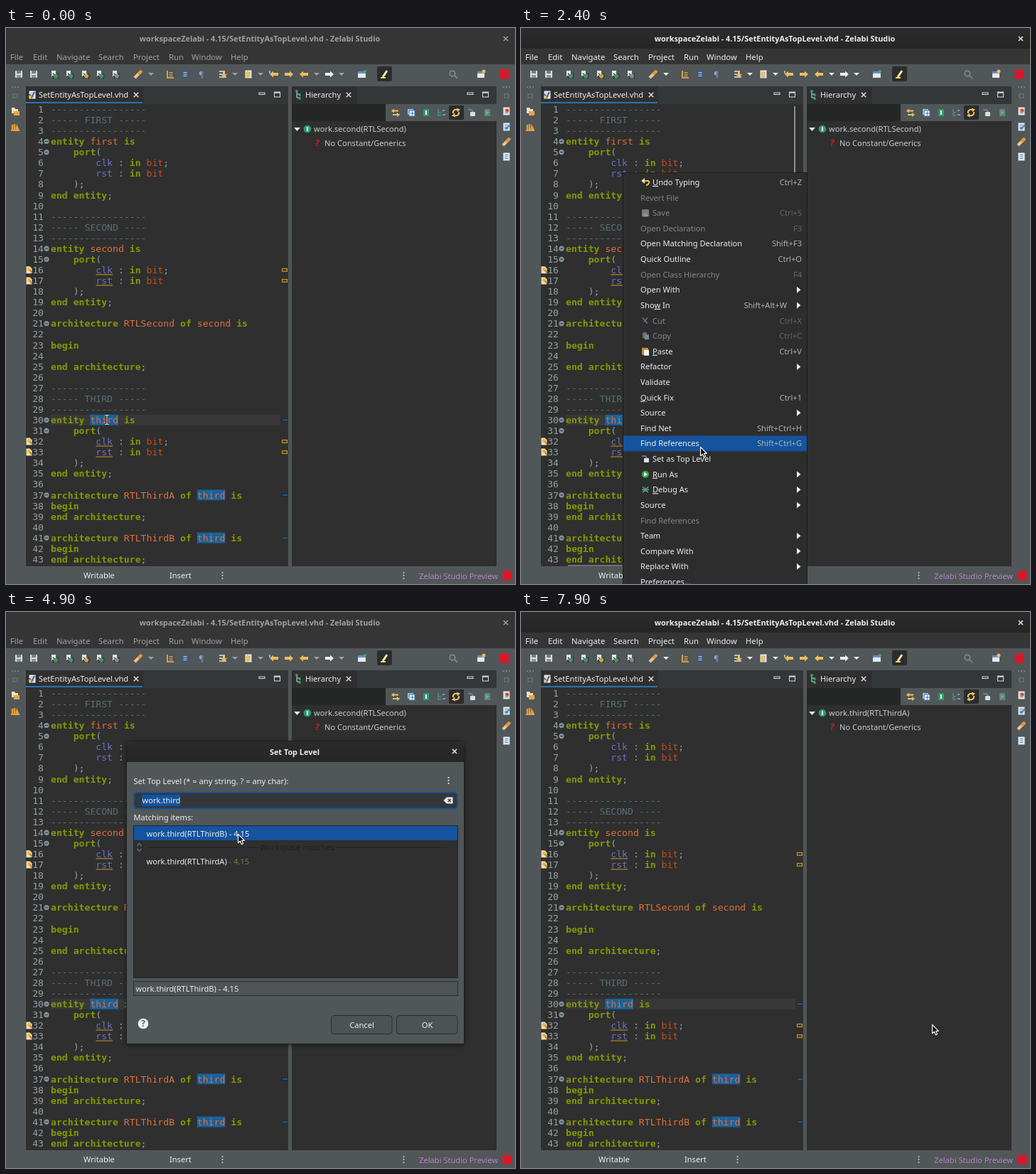
Write an HTML page that moves like this. It is 716 px wide and 782 px high and loops after 8000 ms.

```html
<!DOCTYPE html>
<html lang="en">
<head>
<meta charset="utf-8">
<title>Set Top Level</title>
<style>
html, body { margin: 0; width: 100%; height: 100%; overflow: hidden; background: #515658; }
svg { display: block; }
text { font: 11.1px "Noto Sans", "Open Sans", sans-serif; fill: #eeeeec; white-space: pre; }
.code { font: 13.15px "DejaVu Sans Mono", monospace; fill: #93a1a1; }
.kw { fill: #859900; font-weight: bold; }
.rem { fill: #586e75; }
.id { fill: #e0703a; }
.sig { fill: #6c71c4; }
.type { fill: #cb4b16; }
.bold { font-size: 10.85px; font-weight: bold; }
.ink text, .ink path { fill: currentColor; }
.u { text-decoration: underline; }
.shadow { filter: blur(3px); }

.a { animation: 8s step-end infinite; }
.smooth { animation-timing-function: linear; }
.ink { animation-name: ink; }
.lit { animation-name: lit; }
.vbar { animation-name: vbar; }
.hbar { animation-name: hbar; }
.menu { animation-name: menu; }
.hover { animation-name: hover; }
.dialog { animation-name: dialog; transform-origin: 407px 394px; }
.first { animation-name: first; }
.second { animation-name: second; }
.field { animation-name: field; }
.press { animation-name: press; }
.old { animation-name: old; }
.new { animation-name: new; }
.move { animation-name: move; }
.beam { animation-name: beam; }
.arrow { animation-name: arrow; }
.size { animation-name: size; }

@keyframes ink { 0%, 45% { color: #a0a1a1 } 2.5%, 96.25%, 100% { color: #eeeeec } }
@keyframes lit { 0%, 45% { opacity: 0 } 2.5%, 96.25%, 100% { opacity: 1 } }
@keyframes vbar { 0% { opacity: 0 } 2.5% { opacity: .5 } 16.25% { opacity: .8 } 37.5%, 100% { opacity: 0 } }
@keyframes hbar { 0% { opacity: 0 } 8.75% { opacity: .4 } 16.25% { opacity: .55 } 37.5% { opacity: .3 } 40%, 100% { opacity: 0 } }
@keyframes menu { 0%, 8.7% { opacity: 0 } 8.75% { opacity: .6 } 10%, 44.9% { opacity: 1 } 45% { opacity: .7 } 46.25%, 100% { opacity: 0 } }
@keyframes hover {
  0% { opacity: 0; transform: none }
  23.75% { opacity: 1; transform: translateY(530.4px) }
  25.2% { opacity: 1; transform: translateY(552px) }
  27.4% { opacity: 1; transform: translateY(573.6px) }
  37.5%, 100% { opacity: 1; transform: translateY(595.2px) }
}
@keyframes dialog {
  0%, 45% { opacity: 0; transform: scale(.85) }
  46.25% { opacity: 1; transform: scale(.97) }
  47.5% { opacity: 1; transform: scale(.996) }
  48.75%, 93.8% { opacity: 1; transform: none }
  95% { opacity: .5; transform: scale(.94) }
  96.25%, 100% { opacity: 0; transform: scale(.85) }
}
@keyframes first { 0% { opacity: 0 } 61.25% { opacity: 1 } 72.5%, 100% { opacity: 0 } }
@keyframes second { 0% { opacity: 0 } 72.5%, 100% { opacity: 1 } }
@keyframes field { 0%, 61.2% { stroke: #15539e; stroke-width: 2 } 66%, 100% { stroke: #222627; stroke-width: 1 } }
@keyframes press { 0% { opacity: 0 } 82.5%, 100% { opacity: 1 } }
@keyframes old { 0% { opacity: 1 } 96.25%, 100% { opacity: 0 } }
@keyframes new { 0% { opacity: 0 } 96.25%, 100% { opacity: 1 } }
@keyframes move {
  0%, 22.5% { transform: translate(142px,551px); animation-timing-function: ease-in-out }
  30%, 37.4% { transform: translate(252px,589px) }
  37.5%, 48.5% { transform: translate(287px,606px); animation-timing-function: ease-in-out }
  52.5%, 53.75% { transform: translate(315px,245px); animation-timing-function: ease-in-out }
  58.75%, 71.25% { transform: translate(326px,312px) }
  72.5%, 77.5% { transform: translate(323px,351px); animation-timing-function: ease-in-out }
  83.75%, 88.75% { transform: translate(595px,591px) }
  91.25%, 98.7% { transform: translate(592px,584px) }
  98.75%, 100% { transform: translate(578px,580px) }
}
@keyframes beam { 0% { opacity: 1 } 8.75%, 100% { opacity: 0 } }
@keyframes arrow { 0% { opacity: 0 } 8.75% { opacity: 1 } 46.25% { opacity: 0 } 48.75%, 100% { opacity: 1 } }
@keyframes size { 0% { opacity: 0 } 46.25% { opacity: 1 } 48.75%, 100% { opacity: 0 } }
</style>
</head>
<body>
<svg id="stage" width="716" height="782" viewBox="0 0 716 782"></svg>
<script>
const rect = (x, y, w, h, fill, more = '') => `<rect x="${x}" y="${y}" width="${w}" height="${h}" fill="${fill}" ${more}/>`;
const path = (d, fill, more = '') => `<path d="${d}" fill="${fill}" ${more}/>`;
const line = (d, color, w = 1) => path(d, 'none', `stroke="${color}" stroke-width="${w}"`);
const dot = (x, y, r, fill) => `<circle cx="${x}" cy="${y}" r="${r}" fill="${fill}"/>`;
const group = (cls, ...parts) => `<g class="${cls}">${parts.join('')}</g>`;
const at = (x, y, s) => `<g transform="translate(${x} ${y})">${s}</g>`;
// y is the middle of the capitals
const text = (x, y, s, more = '') => `<text x="${x}" y="${y + 4}" ${more}>${s}</text>`;
const END = 'text-anchor="end"', MID = 'text-anchor="middle"';
const cross = (x, y, r, color) => line(`M${x - r} ${y - r}l${2 * r} ${2 * r}m0 ${-2 * r}l${-2 * r} ${2 * r}`, color, 1.5);
const dots = (x, y, color) => [-4, 0, 4].map(d => dot(x, y + d, 1.1, color)).join('');
const down = x => path(`M${x - 4} 63h8l-4 4z`, '');

// icons, centred on 0,0
const GOLD = '#f0bd5c';
const doc = (c = '#e6e6e0', ink = '#6f8aa5') =>
  rect(-4.5, -5.5, 9, 11, c) + line('M-2.5 -2.5h5M-2.5 0h5M-2.5 2.5h5', ink);
const floppy = c => rect(-5, -5, 10, 10, c, 'rx="1"') + rect(-3, -5, 6, 4, '#777d80') + rect(-3, 1, 6, 4, '#8f9598');
const bug = c => rect(-5, -5, 6, 8, '#e4e4de') + line('M-3 -1L5 6M5 -1L-3 6M-4 2.5h10', '#20292b', 1.2) + dot(1, 2.5, 3, c);
const pen = line('M-5 5L4 -4', '#f0c48a', 4) + line('M0 0L5 -5', '#e0963c', 4);
const arrow = (c, flip = 1) => path(`M${-6 * flip} 0L${-1 * flip} -4.5V-2H${6 * flip}V2H${-1 * flip}V4.5z`, c);
const folder = path('M-5 -5h4l1 2h4v6h-9z', '#f2e3c0') + path('M-2 0h8v6h-8z', '#e5a44b');
const swap = c => line('M-5 -2.5H4M-4 3H5', c, 1.8) + path('M-6 -2.5l4 -3v6zM6 3l-4 -3v6z', c);
const cycle = c => line('M-4 1A4 4 0 0 1 2 -3.5M4 -1A4 4 0 0 1 -2 3.5', c, 2) + path('M1 -6.5l5 2l-4 4zM-1 6.5l-5 -2l4 -4z', c);
const cup = rect(-2, -1, 7, 6, '#d8dfe5', 'rx="1"') + line('M-5 -4h5l2 3', '#6b90c0', 1.6);
const run = dot(0, 0, 5, '#35a853') + path('M-1.7 -3v6l4.5 -3z', '#fff');
const badge = dot(0, 0, 5.3, '#2f9c72') + rect(-1, -3, 2, 6, '#e9fff4');
const square = rect(-6.5, -6.5, 13, 13, '#d7182a');

const source = `-----------------
----- FIRST -----
-----------------
entity first is
    port(
        clk : in bit;
        rst : in bit
    );
end entity;

-----------------
----- SECOND ----
-----------------
entity second is
    port(
        clk : in bit;
        rst : in bit
    );
end entity;

architecture RTLSecond of second is

begin

end architecture;

-----------------
----- THIRD -----
-----------------
entity third is
    port(
        clk : in bit;
        rst : in bit
    );
end entity;

architecture RTLThirdA of third is
begin
end architecture;

architecture RTLThirdB of third is
begin
end architecture;`.split('\n');

const keywords = /^(entity|is|port|in|end|architecture|of|begin)$/;
const kind = w => w.startsWith('--') ? 'rem' : keywords.test(w) ? 'kw'
  : /^(clk|rst)$/.test(w) ? 'sig' : w === 'bit' ? 'type' : 'id';
const paint = s => s.replace(/--.*|\w+/g, w => `<tspan class="${kind(w)}">${w}</tspan>`);

function codeLine(s, i) {
  const y = 114.3 + 15.07 * i, n = i + 1, pitch = 7.917;
  const col = word => 63 + pitch * s.indexOf(word);
  let out = '';
  if (n === 30) out += rect(63, y - 7.5, 323, 15, '#383838');
  if (s.includes('third')) {
    out += rect(col('third'), y - 7.5, 5 * pitch, 15, '#1b6199');
    out += rect(388, y - 1.5, 8, 3, '#14283a') + rect(389, y - .5, 7, 1.2, '#2c7db8');
  }
  if (/clk|rst/.test(s) && n > 10) {
    out += line(`M${63 + 8 * pitch} ${y + 6.5}h${3 * pitch}`, '#b58a2a', 1.2);
    out += rect(388.5, y - 2, 7, 4, '#4a3d1c', 'stroke="#d0a032"');
    out += at(32.5, y, path('M-4 -5h5l3 3v7h-8z', '#f0e2bd') + dot(0, -1, 2.5, '#f3b73a') + line('M1 0l3 4', '#c9812b', 2));
  }
  out += text(53, y + .7, n, `class="code" ${END}`);
  if (/^(entity|arch)|port/.test(s)) out += dot(57, y, 3.6, '#7e94a0') + line(`M55 ${y}h4`, '#2f2f2f');
  return out + text(63, y + .7, paint(s), 'class="code"');
}

const paneButtons = x => rect(x - 4, 91, 8, 2.5, 'none', 'stroke="#ddd"') +
  rect(x + 17.5, 90, 8, 7, 'none', 'stroke="#ddd"') + line(`M${x + 17} 91h9`, '#ddd', 1.5);

function shell() {
  const labels = { File: 6, Edit: 38, Navigate: 71, Search: 130, Project: 179, Run: 229, Window: 261, Help: 316 };
  const tools = [
    [18, floppy('#d9dcdc')], [39, floppy('#d9dcdc')], [69, bug('#3d9960')], [90, bug('#3d9960')], [112, bug('#c9a545')],
    [133, bug('#3d9960')], [155, bug('#7e8e99')], [186, pen],
    [232, doc('#514f48', GOLD) + line('M-5 -5v10h9', GOLD, 1.5)], [252, doc('#40597a', '#b8d0ee')],
    [305, line('M-5 -4h8M-5 0h4M-5 4h10', '#dfe3e5', 1.4) + path('M0 -5h3v5h3l-4.5 5L-3 0h3z', GOLD)],
    [341, doc('#e6e6e0') + path('M-5 0l4 -5l4 5h-2v5h-4v-5z', GOLD)],
    [377, arrow(GOLD) + line('M-6 -5v4', '#fff')], [398, arrow(GOLD, -1)], [419, arrow(GOLD)], [455, arrow('#eef0f0', -1)],
    [501, rect(-6, -4, 11, 9, '#e8eaea') + rect(-6, -4, 11, 3, '#6391c8') + dot(4, -4, 2, '#49a663')],
    [668, rect(-5, -4, 10, 9, '#e8eaea') + rect(-5, -4, 10, 3, '#6391c8') + dot(4, -4, 2.5, GOLD)],
    [701, square]
  ];
  const sides = [
    [13, 117, folder], [13, 139, line('M-4 5V-3M-1 5V-4', '#e39b37', 2.4) + path('M0 5l2 -9l4 9zM-6 4h12v2h-12z', '#e8a040')],
    [704, 117, doc() + dot(1, -1, 2.5, '#d64a3c')], [704, 139, doc('#dfe8ee') + line('M-2 1l2 2l5 -6', '#4289c8', 2)],
    [704, 160, pen], [704, 181, doc('#e5eef5', '#4385c8')],
    [13, 96, rect(-3, -3, 6, 5, 'none', 'stroke="#737a7d"')], [704, 96, rect(-3, -3, 6, 5, 'none', 'stroke="#737a7d"')]
  ];
  const grips = x => [0, 4, 8].map(d => dot(x + d, 83, .8, '#a9adae')).join('');
  return rect(0, 0, 716, 782, '#515658') + rect(0, 0, 716, 51, '#353535') +
    group('a lit', rect(0, 0, 716, 29, 'url(#bar)')) +
    group('a ink',
      text(357, 15, 'workspaceZelabi - 4.15/SetEntityAsTopLevel.vhd - Zelabi Studio', `class="bold" ${MID}`),
      ...Object.entries(labels).map(([s, x]) => text(x, 40.5, s, 'style="font-size:11.3px"')),
      line('M700 12l6 6m0 -6l-6 6', 'currentColor', 1.5),
      ...[204, 322, 358, 437, 472].map(down)) +
    rect(522, 54, 21, 21, '#2a2c2d', 'rx="2"') + at(533, 65, line('M-3 4L3 -5', '#f2e8b0', 3) + line('M-6 5h7', '#f0d43c', 2)) +
    tools.map(([x, s]) => at(x, 65, s)).join('') +
    text(271, 65, '¶', 'style="fill:#7fa8e0"') +
    `<circle cx="628" cy="64" r="3.8" fill="none" stroke="#8b9193" stroke-width="1.4"/>` + line('M631 67l4 4', '#8b9193', 1.6) +
    sides.map(([x, y, s]) => at(x, y, s)).join('') + grips(9) + grips(700) +
    rect(28, 82, 369, 675, '#2f2f2f') + rect(193, 82, 204, 25, '#343738') + rect(28, 104, 164, 2, '#2474b5') +
    at(37, 94, doc('#e8e8e8', '#aaa') + line('M-4 -1l3 5l4 -8', '#37589a', 1.8) + dot(-3, 3, 2, GOLD)) +
    text(46, 94.3, 'SetEntityAsTopLevel.vhd') + cross(183, 94, 3.2, '#ddd') + paneButtons(360) +
    rect(402, 82, 288, 675, '#2f2f2f') + rect(494, 82, 196, 25, '#343738') +
    line('M409 89v9h4M409 93h4', '#d8dad8') + [[409, 89], [413, 94], [413, 99]].map(p => dot(...p, 1.9, '#37a36d')).join('') +
    text(421, 94.3, 'Hierarchy') + cross(482, 94, 3.2, '#ddd') + paneButtons(653) +
    rect(402, 107, 132, 24, '#252626') + rect(534, 107, 156, 24, '#515658') + rect(623, 109, 21, 20, '#2a2c2d', 'rx="2"') +
    at(548, 119, swap(GOLD)) +
    at(570, 119, rect(-5, -5, 8, 8, '#9fc3e8') + rect(-3, -3, 8, 8, '#e6f0fa', 'stroke="#3f77b0"') + line('M-1 1h5M1.5 -1.5v5', '#3f77b0')) +
    at(591, 119, rect(-4, -5, 8, 10, '#2f9c72') + rect(-1, -3, 2, 6, '#e9fff4')) +
    at(612, 119, line('M-4 -5v9h4M-4 0h4', '#3e9c77', 1.3) + line('M2 -3h3M2 3h4', '#7f8fd0', 2)) +
    at(633, 119, cycle(GOLD)) + at(655, 119, cup) + at(677, 119, rect(-4, -5, 8, 10, '#6d8079') + path('M-2 -3v6l5 -3z', '#55c088')) +
    path('M405 140h9l-4.5 5z', '#e6e6e6') + at(424, 142, badge) +
    group('a old', text(433, 142, 'work.second(RTLSecond)', 'style="fill:#c9cbcb"')) +
    group('a new', text(433, 142, 'work.third(RTLThirdA)', 'style="fill:#c9cbcb"')) +
    text(435, 161.5, '?', 'style="fill:#e01b24;font-weight:bold;font-style:italic;font-size:12px"') +
    text(448, 161.5, 'No Constant/Generics', 'style="fill:#c9cbcb"') +
    source.map(codeLine).join('') +
    group('a vbar', rect(384, 110, 2, 435, '#a4a6a6')) + group('a hbar', rect(66, 755, 296, 2, '#a4a6a6')) +
    text(109, 769.5, 'Writable') + text(230, 769.5, 'Insert') + dots(304.5, 770, '#c5c8c8') + dots(559.5, 770, '#c5c8c8') +
    text(692, 770.5, 'Zelabi Studio Preview', `${END} style="fill:#b583c9"`) + at(705, 770, square);
}

// label | accelerator | flags: d disabled, > submenu
const items = `_Undo Typing|Ctrl+Z
Revert File||d
Save|Ctrl+S|d
Open Declaration|F3|d
Open Matching Declaration|Shift+F3
Quick Outline|Ctrl+O
Open Class Hierarchy|F4|d
Open With||>
Sho_w In|Shift+Alt+W|>
Cut|Ctrl+X|d
Copy|Ctrl+C|d
_Paste|Ctrl+V
Refactor||>
Validate
_Quick Fix|Ctrl+1
Source||>
Find Net|Shift+Ctrl+H
Find References|Shift+Ctrl+G
Set as Top Level
_Run As||>
_Debug As||>
Source||>
Find References||d
Team||>
Compare With||>
Replace With||>
Preferences...`.split('\n');

const icons = {
  0: line('M-2 -2h5q3 0 2 3q-1 3 -4 3', GOLD, 2) + path('M-6 -2l5 -4v8z', '#f6d9a0'),
  2: floppy('#7b7f80'),
  9: line('M-4 -4L3 4M3 -4L-2 2', '#66788c', 1.4),
  10: rect(-4, -5, 6, 8, '#62707a') + rect(-1, -2, 6, 7, '#7c8790'),
  11: rect(-5, -5, 9, 10, '#c58b3c') + rect(-2, -2, 7, 8, '#f2f4f6'),
  18: cup, 19: run,
  20: line('M-4 -4L4 4M4 -4L-4 4M-5 0H5', '#7fae9c', 1.2) + dot(0, 0, 2.8, '#3f9b7d')
};

function menuItem(row, i) {
  const [label, accel = '', flags = ''] = row.split('|');
  const y = 217 + 21.615 * i, off = flags.includes('d'), sub = flags.includes('>');
  const name = label.replace(/_(.)/, '<tspan class="u">$1</tspan>');
  return (icons[i] ? at(175, y, icons[i]) : '') +
    text(icons[i] ? 185 : 168, y, name, off ? 'style="fill:#858686"' : '') +
    text(sub ? 374 : 395, y, accel, `${END} style="fill:${off ? '#656666' : '#b0b1b0'}"`) +
    (sub ? path(`M388 ${y - 4.5}v9l5.5 -4.5z`, '#eeeeec') : '');
}

const menu = () => group('a smooth menu',
  rect(143.5, 203.5, 259, 600, '#2d2d2d', 'stroke="#1c1c1c"'),
  group('a hover', rect(144, 0, 258, 21.6, '#15539e')),
  ...items.map(menuItem));

function dialog() {
  const frame = 'M169.5 607.5V189q0 -7.5 8 -7.5H637q7.5 0 7.5 7.5V607.5z';
  const button = (x, s) => rect(x, 567.5, 85.5, 26, '#4d5254', 'rx="4" stroke="#2a2d2e"') + text(x + 43, 580.5, s, MID);
  const pick = (cls, y, s) => group('a ' + cls,
    rect(180, y - 10, 455, 20, '#15539e'), text(197.5, y + .5, s), text(182.5, 530, s));
  const match = (y, s) => text(197.5, y, s + '<tspan fill="#86714a"> - 4.15</tspan>');
  return group('a smooth dialog',
    path(frame, '#000', 'class="shadow" opacity=".5" transform="translate(0 2)"'),
    path(frame, '#515658', 'stroke="#1d1f20"'),
    path('M170 211V189q0 -7 8 -7H637q7 0 7 7V211z', 'url(#head)'),
    text(406, 196.5, 'Set Top Level', `class="bold" ${MID}`), cross(631, 196, 3, '#eee'),
    text(179.5, 237.5, 'Set Top Level (* = any string, ? = any char):'), dots(622.5, 237, '#eee'),
    rect(180, 254, 455, 22.5, '#333739', 'rx="4" class="a smooth field"'),
    rect(191, 257, 54, 16, '#15539e'), text(191.5, 265.3, 'work.third'),
    path('M615.5 265l4.5 -4.5h8.5v9h-8.5z', '#eee'), cross(623.8, 265, 2, '#333739'),
    text(179.5, 289, 'Matching items:'),
    rect(179.5, 300.5, 456, 214, '#2f2f2f', 'stroke="#222627"'),
    match(311, 'work.third(RTLThirdB)'), match(351, 'work.third(RTLThirdA)'),
    line('M199 331h157M463 331h157', '#1e2020'), text(409.5, 331, 'Workspace matches', `${MID} style="fill:#1e2020"`),
    line('M184.5 329l3 -3.5l3 3.5M184.5 333l3 3.5l3 -3.5', '#5c7184', 1.3),
    rect(179.5, 519.5, 456, 20, '#4e5355', 'stroke="#2c3031"'),
    pick('first', 311, 'work.third(RTLThirdB) - 4.15'), pick('second', 350.3, 'work.third(RTLThirdA) - 4.15'),
    dot(193, 579, 7.3, '#f0f0ee'), text(193, 579, '?', `${MID} style="fill:#4c62a0;font-weight:bold;font-size:12px"`),
    button(457.5, 'Cancel'), button(549.5, 'OK'),
    group('a press', rect(549.5, 567.5, 85.5, 26, '#565c5e', 'rx="4" stroke="#747b7e"'), text(592.5, 580.5, 'OK', MID)));
}

function pointer() {
  const outline = 'stroke="#fff" stroke-width="1.1" stroke-linejoin="round"';
  const beam = 'M-3 -6.5h2l1 1l1 -1h2M-3 6.5h2l1 -1l1 1h2M0 -6V6';
  return group('a smooth move',
    group('a beam', line(beam, '#111', 2.6), line(beam, '#f4f4f4', 1.1)),
    group('a arrow', path('M.5 .5V12.8L3.4 10.2L5.4 14.8L7.6 13.8L5.6 9.4H9.4Z', '#111', outline)),
    group('a size', path('M-1 -5H1.6V2H5L.3 6.2L-4.4 2H-1ZM-5.5 6H6V8.5H-5.5Z', '#111', outline)));
}

const shade = (id, y1, y2) => `<linearGradient id="${id}" gradientUnits="userSpaceOnUse" x1="0" x2="0" y1="${y1}" y2="${y2}">
  <stop stop-color="#2b2b2b"/><stop offset="1" stop-color="#262626"/></linearGradient>`;

document.getElementById('stage').innerHTML =
  `<defs>${shade('bar', 0, 29)}${shade('head', 181, 211)}</defs>` + shell() + menu() + dialog() + pointer();
</script>
</body>
</html>
```
